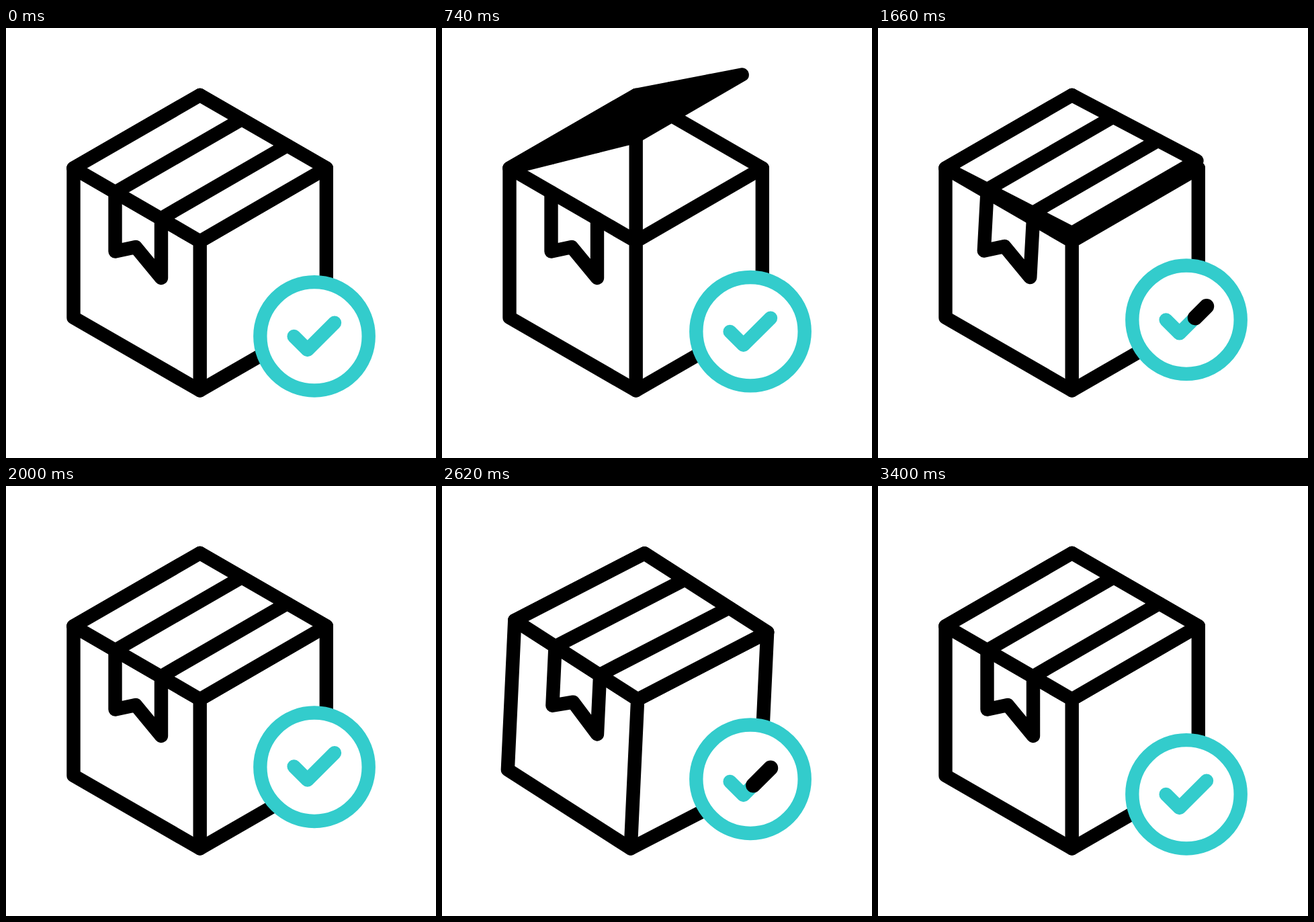
These frames come from a looping animation (640 px wide and 640 px high, 3600 ms). An HTML page:

```html
<!DOCTYPE html>
<html>
<head>
<meta charset="utf-8">
<title>Parcel check</title>
<style>
html, body { margin: 0; width: 100%; height: 100%; overflow: hidden; background: #fff; }
svg { display: block; width: 100vw; height: 100vh; }
</style>
</head>
<body>
<svg viewBox="0 0 640 640" fill="none" stroke-width="20.4" stroke-linecap="round" stroke-linejoin="round">
  <g id="box" stroke="#000">
    <path d="M100.5 208.5L288.7 100L476.8 208.5V431L288.7 539.5L100.5 431Z" fill="#fff"/>
    <path d="M288.7 100V539.5M100.5 208.5L288.7 317.5L476.8 208.5"/>
    <path id="ribbon"/>
    <path id="lid" fill="#fff"/>
    <path id="tape"/>
  </g>
  <g id="rays" stroke="#33cccc"></g>
  <circle id="ring" cx="459" cy="458.8" r="80.7" fill="#fff" stroke="#33cccc"/>
  <g id="check" stroke="#33cccc">
    <path d="M428.6 459L448.7 479L489 438.8"/>
    <path id="glint" d="M428.6 459L448.7 479L489 438.8" stroke="#000" stroke-width="22.5" pathLength="1"/>
  </g>
</svg>
<script>
const LOOP = 3600, END = 3400;
const $ = id => document.getElementById(id);
const box = $('box'), ribbon = $('ribbon'), lid = $('lid'), tape = $('tape');
const ring = $('ring'), check = $('check'), glint = $('glint');

const LEFT = [100.5, 208.5], BACK = [288.7, 100];

// keyframes as [time, value], eased in and out between neighbours
const LID = [[0, 0], [600, 1], [1000, 0], [1400, 0.2], [1800, 0]];
const SWAY = [[1000, 0], [1150, -17.5], [1375, 11], [1600, -6], [1800, 0]];
const HOP = 46.4;
const HOPS = [[0, 0], [375, HOP], [860, 0], [1400, 0], [1900, HOP]];
const CHECK_HOPS = [...HOPS, [2400, 0], [2900, HOP], [3400, 0]];
const RING_HOPS = [...HOPS, [2350, 0], [2900, HOP], [3400, 0]];

// inner end, outer end
const rays = [
  [486, 152, 494, 118.5],
  [516.5, 185.5, 546.5, 167.5],
  [532, 228, 566, 236.5]
].map(([x1, y1, x2, y2]) => {
  const el = document.createElementNS('http://www.w3.org/2000/svg', 'path');
  $('rays').appendChild(el);
  return { el, a: [x1, y1], b: [x2, y2] };
});

const ramp = (t, a, b) => Math.min(1, Math.max(0, (t - a) / (b - a)));
const ease = (t, a, b) => { const k = ramp(t, a, b); return k * k * (3 - 2 * k); };
const mix = (p, q, k) => [p[0] + (q[0] - p[0]) * k, p[1] + (q[1] - p[1]) * k];
const line = (...pts) => 'M' + pts.map(p => p[0].toFixed(2) + ' ' + p[1].toFixed(2)).join('L');
const show = (el, on) => { el.style.display = on ? '' : 'none'; };

function track(t, keys) {
  let v = keys[0][1];
  for (let i = 1; i < keys.length; i++) {
    const [t0, v0] = keys[i - 1], [t1, v1] = keys[i];
    v += (v1 - v0) * ease(t, t0, t1);
  }
  return v;
}

function drawLid(t) {
  const open = track(t, LID);
  const right = [476.8 - 42 * open, 208.5 - 193.5 * open];
  const front = [288.7, 317.5 - 217.5 * open];
  lid.setAttribute('d', line(LEFT, BACK, right, front) + 'Z');
  tape.setAttribute('d', [0.33, 0.69].map(k => line(mix(LEFT, front, k), mix(BACK, right, k))).join(''));
}

function drawRibbon(t) {
  const dx = track(t, SWAY), dy = -Math.abs(dx) * 0.2;
  const low = (x, y) => [x + dx, y + dy];
  ribbon.setAttribute('d', line([162.5, 244.5], low(162.5, 332.5), low(193, 326), low(231, 372), [231, 284]));
}

function drawRays(t) {
  const head = ease(t, 940, 1070), tail = ease(t, 1130, 1380);
  for (const { el, a, b } of rays) {
    el.setAttribute('d', line(mix(a, b, tail), mix(a, b, head)));
    show(el, head > 0 && tail < 1);
  }
}

function drawBadge(t) {
  const lift = (el, keys) => el.setAttribute('transform', `translate(0 ${-track(t, keys).toFixed(2)})`);
  lift(ring, RING_HOPS);
  lift(check, CHECK_HOPS);
  const s = t < 2000 ? t : t - 1000;
  const head = ease(s, 1000, 1400), tail = ease(s, 1400, 1800);
  show(glint, head > 0 && tail < 1);
  glint.setAttribute('stroke-dasharray', `${head - tail} 3`);
  glint.setAttribute('stroke-dashoffset', -tail);
}

function draw(t) {
  const tilt = -3 * Math.sin(ramp(t, 2110, 3240) * Math.PI * 3);
  box.setAttribute('transform', `rotate(${tilt.toFixed(3)} 286 370)`);
  drawLid(t);
  drawRibbon(t);
  drawRays(t);
  drawBadge(t);
}

let start;
function tick(now) {
  if (start === undefined) start = now;
  draw(Math.min((now - start) % LOOP, END));
  requestAnimationFrame(tick);
}
draw(0);
requestAnimationFrame(tick);
</script>
</body>
</html>
```
